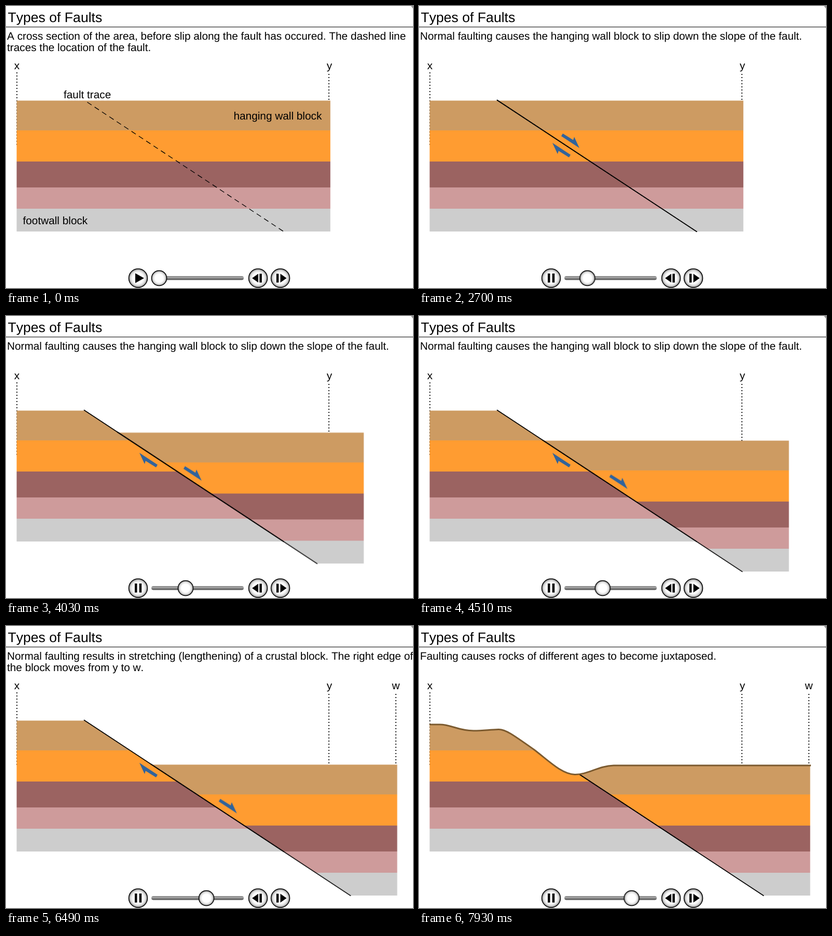
Recreate the animation shown at these times as an HTML page. Size 784 by 544 pixels, loop 7990 ms.

```html
<!DOCTYPE html>
<html lang="en">
<head>
<meta charset="utf-8">
<title>Types of Faults</title>
<style>
html, body { margin: 0; width: 100%; height: 100%; overflow: hidden; background: #fff; }
svg { display: block; width: 784px; height: 544px; }
text {
  font: 20.79px "Liberation Sans", Arial, sans-serif;
  font-kerning: none;
  text-rendering: geometricPrecision;
}
.title { font-size: 26.6px; }
.middle { text-anchor: middle; }
.fault { stroke: #000; stroke-width: 1.7; }
.dots { stroke: #000; stroke-width: 1.8; stroke-dasharray: 2 4; }
.arrow { fill: #31639c; }
.ring { fill: url(#metal); stroke: #000; stroke-width: 1.5; }

/* One shared 7.99 s loop; motion advances in 60 ms ticks. */
.play, .pause, .intro, .active, .slipText, .stretch, .stretchText, .ageText, .worn {
  animation: 7990ms step-end infinite;
}
.play { animation-name: play; }
.pause { animation-name: pause; }
.intro { animation-name: intro; }
.active { animation-name: active; }
.slipText { animation-name: slipText; }
.stretch { animation-name: stretch; }
.stretchText { animation-name: stretchText; }
.ageText, .worn { animation-name: erosion; }
.knob { animation: knob 7990ms infinite; }
.slip { --slip: translate(128.7px, 84.9px); animation: slip 7990ms infinite; }
.arrow.slip { --slip: translate(135.7px, 87.5px); }
.fresh { animation: fadeOut 7990ms infinite; }
.crest { animation: fadeIn 7990ms infinite; }

@keyframes play { 0% { opacity: 1; } 9.7%, 100% { opacity: 0; } }
@keyframes pause { 0% { opacity: 0; } 9.7%, 100% { opacity: 1; } }
@keyframes intro { 0% { opacity: 1; } 10.45%, 100% { opacity: 0; } }
@keyframes active { 0% { opacity: 0; } 10.45%, 100% { opacity: 1; } }
@keyframes slipText { 0% { opacity: 0; } 10.45% { opacity: 1; } 67.522%, 100% { opacity: 0; } }
@keyframes stretch { 0% { opacity: 0; } 67.522%, 100% { opacity: 1; } }
@keyframes stretchText { 0% { opacity: 0; } 67.522% { opacity: 1; } 90.05%, 100% { opacity: 0; } }
@keyframes erosion { 0% { opacity: 0; } 90.05%, 100% { opacity: 1; } }
@keyframes knob {
  0% { transform: none; }
  11.2015% { transform: translateX(0); animation-timing-function: steps(118); }
  99.8123%, 100% { transform: translateX(115.5px); }
}
@keyframes slip {
  0% { transform: none; }
  33.7297% { transform: translate(0, 0); animation-timing-function: steps(44); }
  66.771%, 100% { transform: var(--slip); }
}
@keyframes fadeOut {
  0% { opacity: 1; }
  90.05% { opacity: 1; animation-timing-function: steps(10); }
  97.56%, 100% { opacity: 0; }
}
@keyframes fadeIn {
  0% { opacity: 0; }
  90.05% { opacity: 0; animation-timing-function: steps(10); }
  97.56%, 100% { opacity: 1; }
}
</style>
</head>
<body>
<svg viewBox="0 0 784 544">
  <defs>
    <radialGradient id="metal">
      <stop offset=".55" stop-color="#fff"/>
      <stop offset=".8" stop-color="#ddd"/>
      <stop offset="1" stop-color="#777"/>
    </radialGradient>
    <linearGradient id="rail" x2="0" y2="1">
      <stop offset="0" stop-color="#777"/>
      <stop offset=".35" stop-color="#aaa"/>
      <stop offset="1" stop-color="#444"/>
    </linearGradient>
    <clipPath id="footClip"><path d="M20 182H152L537 436H20Z"/></clipPath>
    <clipPath id="hangClip"><path d="M151 182H626V436H536Z"/></clipPath>
    <clipPath id="wornClip">
      <path d="M20 190H40C62 190 75 202 105 202C125 202 135 200 153 199.5C166 199 180 209 221 238C250 260 275 286 300 286.5C325 287 345 270 375 269H756V544H20Z"/>
    </clipPath>
    <g id="layers">
      <path fill="#cd9b62" d="M20.5 182.5h604.3V240H20.5Z"/>
      <path fill="#ff9c31" d="M20.5 240h604.3v60H20.5Z"/>
      <path fill="#9b6361" d="M20.5 300h604.3v50H20.5Z"/>
      <path fill="#ce9b9b" d="M20.5 350h604.3v41H20.5Z"/>
      <path fill="#cdcdcd" d="M20.5 391h604.3v44H20.5Z"/>
    </g>
    <g id="foot" clip-path="url(#footClip)"><use href="#layers"/></g>
    <g id="hang" clip-path="url(#hangClip)"><use href="#layers"/></g>
    <path id="fault" class="fault" d="M150 181.3L535.5 435.6"/>
    <path id="arrow" d="M277 246L297 258.5L299 252.5L309 274L274 251Z"/>
    <circle id="button" class="ring" r="18"/>
  </defs>

  <path fill="#999" d="M780 0H784V5Z"/>
  <text class="title" x="3.5" y="31">Types of Faults</text>
  <path stroke="#000" stroke-width="1.1" d="M0 40.5H784"/>

  <g class="intro">
    <text x="2" y="65">A cross section of the area, before slip along the fault has occured. The dashed line</text>
    <text x="2" y="87">traces the location of the fault.</text>
  </g>
  <text class="slipText" x="2" y="65">Normal faulting causes the hanging wall block to slip down the slope of the fault.</text>
  <g class="stretchText">
    <text x="2" y="65">Normal faulting results in stretching (lengthening) of a crustal block. The right edge of</text>
    <text x="2" y="87">the block moves from y to w.</text>
  </g>
  <text class="ageText" x="2" y="65">Faulting causes rocks of different ages to become juxtaposed.</text>

  <text class="middle" x="21" y="122">x</text>
  <path class="dots" d="M21 128V270"/>
  <text class="middle" x="623" y="122">y</text>
  <path class="dots" d="M622 131V270"/>
  <g class="stretch">
    <text class="middle" x="751" y="122">w</text>
    <path class="dots" d="M751 131V270"/>
  </g>

  <g class="worn">
    <g clip-path="url(#wornClip)">
      <use href="#foot"/>
      <g transform="translate(128.7 84.9)"><use href="#hang"/></g>
      <use href="#fault"/>
      <use href="#fault" x="128.7" y="84.9"/>
    </g>
  </g>

  <g class="fresh">
    <use href="#foot"/>
    <g class="slip"><use href="#hang"/></g>
    <g class="active">
      <use href="#fault"/>
      <g class="slip"><use href="#fault"/></g>
      <use class="arrow" href="#arrow" transform="rotate(180 283 269)"/>
      <g class="arrow slip"><use href="#arrow"/></g>
    </g>
  </g>

  <path class="crest" fill="none" stroke="#7b5a2f" stroke-width="3" d="M20 190H40C62 190 75 202 105 202C125 202 135 200 153 199.5C166 199 180 209 221 238C250 260 275 286 300 286.5C325 287 345 270 375 269H755"/>

  <g class="intro">
    <path stroke="#000" stroke-width="1.3" stroke-dasharray="10 7" d="M156.5 185.5L535.5 435.5"/>
    <text x="111" y="178">fault trace</text>
    <text x="438.5" y="218.5">hanging wall block</text>
    <text x="32.5" y="421">footwall block</text>
  </g>

  <rect x="280" y="521" width="178" height="7.5" rx="3.7" fill="url(#rail)"/>
  <circle class="ring knob" cx="295" cy="525" r="14.6"/>
  <use href="#button" x="254.5" y="525"/>
  <path class="play" d="M249 515.5L266 525L249 534.5Z"/>
  <path class="pause" d="M248 516h4.5v17.5H248ZM256.7 516h4.5v17.5h-4.5Z"/>
  <use href="#button" x="485.5" y="525"/>
  <path d="M474 525L486 516.5V533.5ZM488.3 516.5h4.5v17h-4.5Z"/>
  <use href="#button" x="528.5" y="525"/>
  <path d="M540.5 525L528.5 516.5V533.5ZM520.8 516.5h4.5v17h-4.5Z"/>
</svg>
</body>
</html>
```
